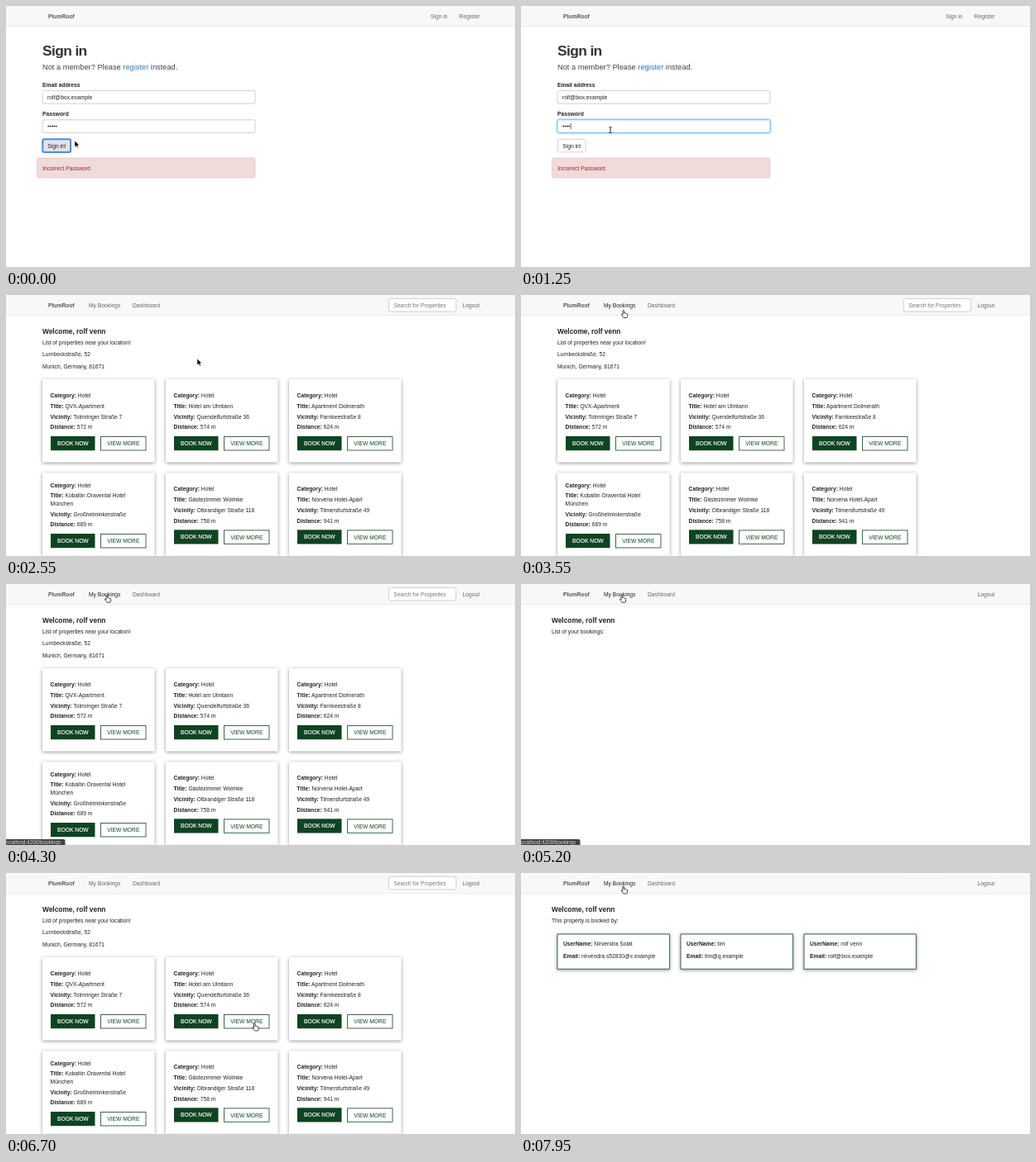
These frames come from a looping animation (615x316 px, 8 s). An HTML page:

```html
<!DOCTYPE html>
<html lang="en">
<head>
<meta charset="utf-8">
<title>Property booking</title>
<style>
  html, body { margin: 0; width: 100%; height: 100%; overflow: hidden; background: #fff; }
  svg { display: block; width: 615px; height: 316px; }
  text { font: 6.72px "Liberation Sans", Arial, sans-serif; fill: #222; white-space: pre; }
  .b { font-weight: bold; }
  .h1 { font-size: 17.4px; font-weight: bold; letter-spacing: -.62px; fill: #333; }
  .h4 { font-size: 8.35px; font-weight: bold; }
  .lead { font-size: 9.28px; fill: #444; }
  .link { fill: #337ab7; }
  .nav { fill: #666; }
  .nav.on { fill: #222; }
  .logo { font-weight: bold; fill: #555; }
  .hint { fill: #777; }
  .field { fill: #fff; stroke: #c4c4c4; stroke-width: .8; }
  .field.on { stroke: #66afe9; filter: drop-shadow(0 0 1.5px #66afe9); }
  .btn { fill: #fff; stroke: #c4c4c4; stroke-width: .8; }
  .btn.over { fill: #e6e6e6; stroke: #adadad; }
  .btn.on { fill: #e2e2e6; stroke: #4b8ae0; stroke-width: 2; }
  .error { fill: #f0dada; stroke: #e8c9cd; stroke-width: .8; }
  .alert { fill: #96292b; }
  .card { fill: #fff; filter: drop-shadow(0 1.5px 2px rgba(0,0,0,.42)); }
  .guest { stroke: #2c5b47; stroke-width: .9; }
  .solid { fill: #0e4421; }
  .line { fill: #fff; stroke: #0e4421; stroke-width: .8; }
  .white { fill: #fff; stroke: #fff; stroke-width: .15; }
  .green { fill: #0e4421; }
  .tip { font-size: 6.3px; fill: #d8d8d8; }
</style>
</head>
<body>
<svg id="stage" viewBox="0 0 615 316"></svg>
<script>
const LOOP = 8000, STEP = 50;
const USER = "rolf venn", MAIL = "rolf@box.example";

const text = (x, y, s, cls = "", id = "") => `<text x="${x}" y="${y}" class="${cls}" id="${id}">${s}</text>`;
const rect = (x, y, w, h, cls, r = 0, id = "") =>
  `<rect x="${x}" y="${y}" width="${w}" height="${h}" rx="${r}" class="${cls}" id="${id}"/>`;
const group = (id, s) => `<g id="${id}">${s}</g>`;
const pair = (x, y, key, value) => text(x, y, `<tspan class="b">${key}:</tspan> ${value}`);

const hotels = [
  ["QVX-Apartment", "Tolmringer Straße 7", 572],
  ["Hotel am Ulmtann", "Quendelfurtstraße 36", 574],
  ["Apartment Dolmerath", "Farnkeestraße 8", 624],
  ["Kobaltin Oravental Hotel|München", "Großhelminkerstraße", 689],
  ["Gästezimmer Wolmke", "Olbrandiger Straße 118", 758],
  ["Norvena Hotel-Apart", "Tilmersfurtstraße 49", 941]
];
const guests = [
  ["Nirvendra Solat", "nirvendra.s52830@x.example"],
  ["tim", "tim@q.example"],
  [USER, MAIL]
];

function hotelCard([title, street, metres], i) {
  const x = 44 + i % 3 * 149, y = 102 + (i > 2) * 113.3;
  const [first, second] = title.split("|");
  const shift = second ? 4.7 : 0, left = x + 9.6, low = y + shift;
  return rect(x, y, 135.6, 100.5, "card") +
    pair(left, y + 21.9 - shift, "Category", "Hotel") +
    pair(left, y + 34.8 - shift, "Title", first) +
    (second ? text(left, y + 39.6, second) : "") +
    pair(left, low + 47.6, "Vicinity", street) +
    pair(left, low + 60.4, "Distance", metres + " m") +
    rect(x + 10, low + 69, 53.5, 17.2, "solid") + text(x + 18, low + 80, "BOOK NOW", "white") +
    rect(x + 70.4, low + 69.6, 54.6, 16.4, "line") + text(x + 78.2, low + 80.3, "VIEW MORE", "green");
}

function guestCard([name, mail], i) {
  const x = 44 + i * 149;
  return rect(x, 74, 135.4, 42.2, "card guest") +
    pair(x + 7, 88.3, "UserName", name) + pair(x + 7, 102.5, "Email", mail);
}

const signPage =
  text(513, 15, "Sign in", "nav") + text(547.6, 15, "Register", "nav") +
  text(44, 60, "Sign in", "h1") +
  text(44, 77.4, 'Not a member? Please <tspan class="link">register</tspan> instead.', "lead") +
  text(44, 97.6, "Email address", "b") + rect(44, 102.6, 257, 15.6, "field", 2) + text(50, 113, MAIL) +
  text(44, 132.8, "Password", "b") + rect(44, 137.8, 257, 15.6, "field", 2, "pass") +
  [0, 1, 2, 3, 4].map(i => `<circle cx="${51.2 + i * 2.35}" cy="145.6" r=".85" id="dot${i}"/>`).join("") +
  rect(0, 142, .6, 7.2, "", 0, "caret") +
  rect(44.3, 161.3, 33.8, 15.6, "btn", 2, "submit") + text(50.2, 171.5, "Sign in!") +
  group("error", rect(37.4, 184, 263.6, 24, "error", 2) + text(44.2, 198.6, "Incorrect Password", "alert"));

const listPage =
  rect(462.4, 4.4, 81.4, 15.6, "field", 2) + text(468.2, 14.6, "Search for Properties", "hint") +
  text(44, 46.9, "", "h4", "hello") + text(44, 60, "List of properties near your location!") +
  group("results", text(44, 74.4, "Lurnbeckstraße, 52") + text(44, 88.7, "Munich, Germany, 81671") +
    hotels.map(hotelCard).join(""));

const greeting = line => text(37, 46.9, "Welcome, " + USER, "h4") + text(37, 60, line);

const $ = id => document.getElementById(id);
$("stage").innerHTML =
  rect(0, 0, 615, 24.5, "", 0, "bar") + rect(0, 24, 615, .7, "", 0, "rule") + text(51, 15, "PlumRoof", "logo") +
  group("member", text(100, 15, "My Bookings", "nav", "bookingsLink") +
    text(153, 15, "Dashboard", "nav", "dashLink") + text(551.6, 15, "Logout", "nav")) +
  group("sign", signPage) + group("list", listPage) +
  group("booked", greeting("List of your bookings:")) +
  group("guests", greeting("This property is booked by:") + guests.map(guestCard).join("")) +
  group("status", '<path d="M0 309H69.5Q71.5 309 71.5 311V316H0Z" fill="#404144"/>' + text(-1.3, 315, "", "tip", "url")) +
  group("cursor",
    '<path id="arrow" d="M0 0V8L1.9 6.3 3.1 9.1 4.4 8.5 3.2 5.8H5.7Z" stroke="#fff" stroke-width=".5"/>' +
    '<path id="hand" d="M-1 1Q-1 0-.2 0T.7 1V3.4Q1.5 2.8 2.1 3.7 3 3.2 3.5 4.1 4.6 3.8 4.7 5V6.6Q4.7 8 3.8 9H.2Q-.8 7.6-2.4 5.8-2.6 4.6-1.6 4.9L-1 5.5Z" fill="#fff" stroke="#111" stroke-width=".8"/>' +
    '<path id="beam" d="M-1.7-3.4Q0-3.4 0-2.4 0-3.4 1.7-3.4M0-2.4V2.6M-1.7 3.5Q0 3.5 0 2.6 0 3.5 1.7 3.5" fill="none" stroke="#111" stroke-width=".9"/>');
$("bar").setAttribute("fill", "#f8f8f8");
$("rule").setAttribute("fill", "#e4e4e4");

// Pointer stops: time, x, y
const path = [
  [0, 83, 163], [150, 92, 140], [250, 106, 103], [350, 112, 112], [500, 113, 143], [800, 113, 143],
  [900, 108, 150], [1250, 108, 150], [1400, 122, 79], [1550, 80, 186], [1700, 61, 167], [2350, 61, 167],
  [2450, 165, 50], [2550, 231, 77], [2650, 354, 200], [2700, 290, 286], [2750, 239, 240], [3050, 239, 240],
  [3500, 125, 20], [3700, 121, 14], [4000, 121, 14], [4300, 122, 13.3], [5200, 122, 13.3], [5300, 197, 16],
  [5350, 172, 12], [5600, 171.5, 10.5], [5800, 173, 12], [6100, 240, 110], [6300, 288, 178],
  [6700, 300.5, 182], [7000, 300.5, 182], [7150, 190, 78], [7450, 190, 78], [7700, 130, 40], [7950, 123.8, 16]
];
const pages = [[0, "sign"], [2000, "list"], [4400, "booked"], [5500, "list"], [6750, "guests"]];

function pointer(t) {
  const i = path.findIndex(p => p[0] > t);
  if (i < 0) return path[path.length - 1].slice(1);
  const [t0, x0, y0] = path[i - 1], [t1, x1, y1] = path[i];
  const k = (t - t0) / (t1 - t0);
  return [x0 + (x1 - x0) * k, y0 + (y1 - y0) * k];
}

const show = (id, on) => { $(id).style.display = on ? "" : "none"; };
const mark = (id, cls, on) => $(id).classList.toggle(cls, on);
const between = (t, a, b) => t >= a && t < b;

function draw(t) {
  const page = pages.filter(p => p[0] <= t).pop()[1];
  const [x, y] = pointer(t);
  const inside = (l, top, r, b) => x >= l && x <= r && y >= top && y <= b;
  for (const id of ["sign", "list", "booked", "guests"]) show(id, id === page);
  const sign = page === "sign", list = page === "list";
  show("member", !sign);

  const typing = between(t, 450, 1700), dots = t < 1250 ? 5 : 4;
  const onSubmit = sign && inside(44, 161, 78, 177);
  mark("pass", "on", typing);
  mark("submit", "on", !typing);
  mark("submit", "over", onSubmit);
  show("dot4", dots > 4);
  show("caret", typing);
  $("caret").setAttribute("x", 50.2 + dots * 2.4);

  const age = t - (t < 5500 ? 2000 : 5500);
  show("results", age >= 50);
  $("hello").textContent = "Welcome," + (age >= (t < 5500 ? 100 : 150) ? " " + USER : "");

  const onBookings = !sign && inside(94, 0, 145, 23), onDash = !sign && inside(148, 0, 192, 23);
  mark("bookingsLink", "on", onBookings);
  mark("dashLink", "on", onDash);
  show("status", between(t, 3600, 5850));
  $("url").textContent = "localhost:4200/" + (t < 5300 ? "bookings" : "dashboard");

  const onCard = list && (inside(263, 171, 319, 188) || inside(203, 171, 257, 188) || inside(54, 171, 108, 188));
  const hand = onBookings || onDash || onSubmit || onCard;
  const beam = sign && (inside(44, 102, 301, 118) || inside(44, 138, 301, 153.5));
  show("hand", hand);
  show("beam", beam);
  show("arrow", !hand && !beam);
  $("cursor").setAttribute("transform", `translate(${x} ${y})`);
}

const start = performance.now();
function tick(now) {
  const t = Math.max(0, now - start) % LOOP;
  draw(Math.floor(t / STEP) * STEP);
  requestAnimationFrame(tick);
}
draw(0);
requestAnimationFrame(tick);
</script>
</body>
</html>
```
